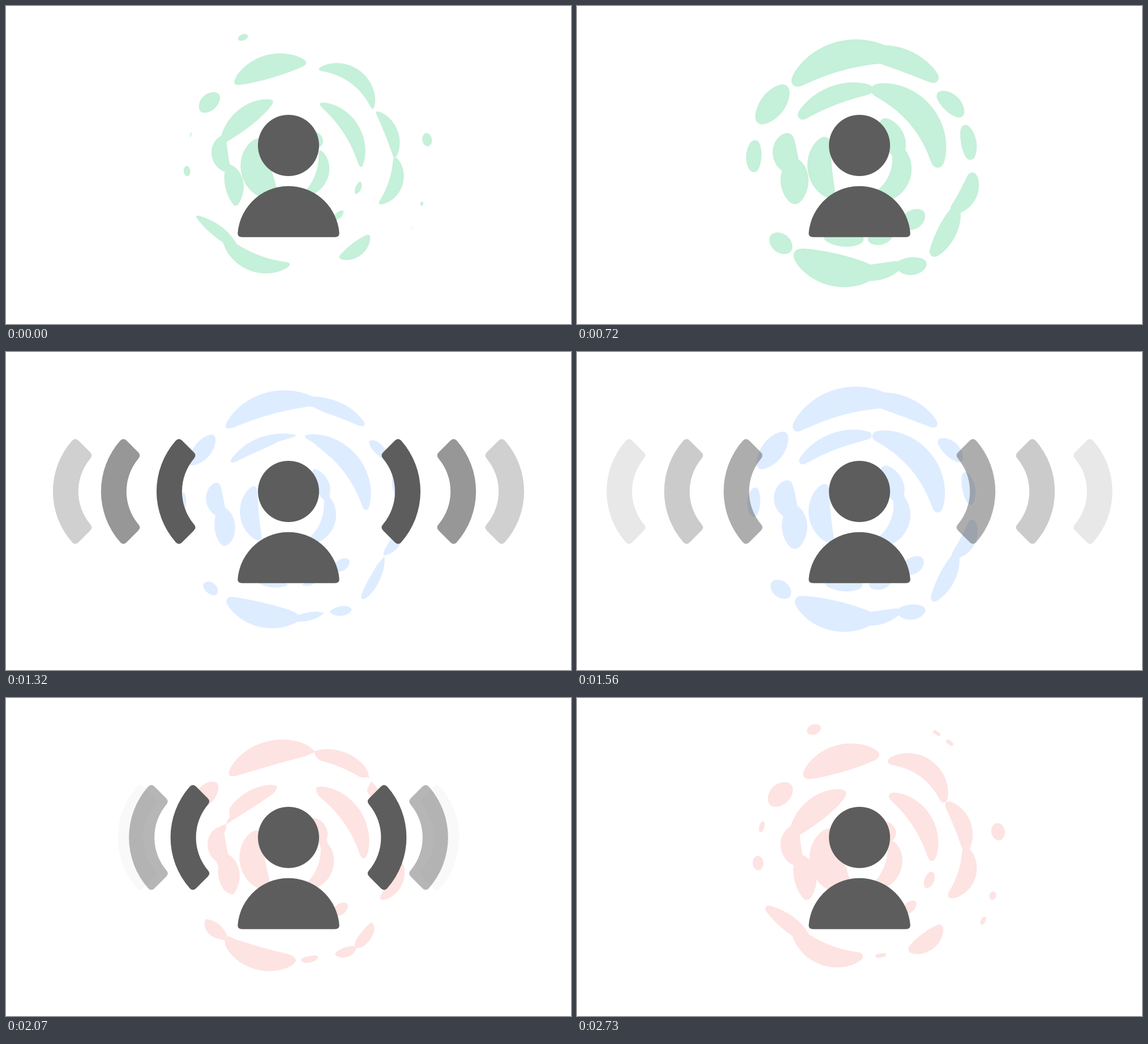
Recreate the animation shown at these times as an HTML page with a canvas. Size 998x561 px, loop 2.79 s.

```html
<!DOCTYPE html>
<html lang="en">
<head>
<meta charset="utf-8">
<title>Person with signal waves</title>
<style>
html, body { margin: 0; width: 100%; height: 100%; overflow: hidden; background: #fff; }
canvas { display: block; }
</style>
</head>
<body>
<canvas id="stage" width="998" height="561"></canvas>
<script>
const ctx = document.getElementById('stage').getContext('2d');
const CYCLE = 930, STEP = 30, LAST = 870;
const GREY = '#5d5d5d';
const TINTS = [[197, 240, 217], [222, 236, 255], [253, 227, 226]];
const RAD = Math.PI / 180;
const clamp = v => Math.max(0, Math.min(1, v));
const mix = (a, b, w) => a + (b - a) * w;

// Ripples are broken rings around one centre. Each pose is a clamped distance
// field, so the pieces merge and split when poses are mixed.
const X0 = 288, Y0 = 30, N = 480, REACH = 14;
const CX = 505 - X0, CY = 275 - Y0;
let field, scale;

function stamp(x, y, r) {
  const far = Math.max(r, 0) + REACH;
  const lo = v => Math.max(0, Math.floor(v - far));
  const hi = v => Math.min(N - 1, Math.ceil(v + far));
  for (let j = lo(y); j <= hi(y); j++) {
    for (let i = lo(x); i <= hi(x); i++) {
      const d = Math.min(REACH, r - Math.hypot(i + 0.5 - x, j + 0.5 - y));
      if (d > field[j * N + i]) field[j * N + i] = d;
    }
  }
}

// Tapered stroke between two angles; the radius passes through r0, r1, r2
function arc(from, to, w, r0, r1 = r0, r2 = r0) {
  const n = 4 + Math.ceil(Math.abs(to - from) * RAD * r1 / 2);
  for (let i = 0; i <= n; i++) {
    const u = i / n, a = mix(from, to, u) * RAD;
    const r = scale * (r0 * (1 - u) * (1 - 2 * u) + 4 * r1 * u * (1 - u) + r2 * u * (2 * u - 1));
    const taper = 0.2 + 0.8 * Math.abs(Math.sin(Math.PI * u)) ** 0.75;
    stamp(CX + r * Math.cos(a), CY + r * Math.sin(a), w * taper);
  }
}

const dot = (angle, r, w, half) => arc(angle - half, angle + half, w, r);

function pose(draw, size = 1) {
  field = new Float32Array(N * N).fill(-REACH);
  scale = size;
  draw();
  return field;
}

function calmRings() {
  // outer
  arc(235, 277, 21, 171, 173, 176);
  arc(287, 326, 14, 171, 187, 172);
  arc(330, 357, 12, 174, 183, 182);
  arc(358, 385, 13, 182, 187, 172);
  arc(63, 44, 13, 189, 192, 188);
  arc(132, 92, 16, 179, 190, 181);
  arc(150, 122, 11, 193, 179, 181);
  arc(210, 221.5, 15, 183, 180, 176);
  // middle
  arc(251, 196, 18, 112, 114, 128);
  arc(200, 172, 15, 128, 128, 112);
  arc(176, 143, 17, 112, 109, 124);
  arc(297, 363, 15, 114, 119, 122);
  dot(21.4, 126, 5.5, 5);
  dot(49, 125, 6, 5);
  // inner
  arc(212, 118, 27, 68, 65, 66);
  arc(340, 430, 12, 53, 58, 62);
  dot(316, 57, 13, 11);
  // droplets; the thinnest only show when thickened
  dot(248.5, 236, 6, 2);
  dot(175, 186, 6.5, 2.4);
  dot(350.7, 242, 9, 2.2);
  dot(17.8, 241, 3, 0.8);
  dot(301.4, 250, 0, 1);
  dot(308, 249, 0.5, 1);
  dot(195, 185, 1.5, 2);
  dot(29, 243, 1, 1);
  dot(80, 182, 0.5, 2);
}

function wideRings() {
  // outer
  arc(231, 285, 19, 184, 191, 193);
  arc(272, 310, 13, 192, 193, 194);
  arc(320, 333, 9, 181, 187, 191);
  dot(349.5, 190, 7, 7);
  arc(8, 27, 9, 195, 194, 183);
  arc(28, 51.5, 10, 185, 193, 203);
  arc(70, 60, 9, 195, 203, 208);
  arc(95, 72, 8, 195, 196, 193);
  arc(124, 86, 22, 199, 197, 195);
  arc(139, 131.5, 10, 206, 204, 203);
  dot(183, 193, 7, 6);
  arc(203, 222, 15, 195, 189, 189);
  // middle
  arc(218, 274, 10, 135, 128, 128);
  arc(281, 360, 18, 129, 131, 132);
  arc(197, 174, 15, 139, 138, 122);
  arc(178, 152, 18, 122, 125, 136);
  arc(55, 43, 10, 132, 135, 137);
  arc(115, 93, 9, 145, 138, 136);
  dot(77, 137, 6, 6);
  // inner
  arc(207, 138, 15, 76, 77, 80);
  arc(300, 345, 13, 78, 68, 64);
  arc(340, 425, 12, 64, 70, 67);
}

const calm = pose(calmRings);
const wide = pose(wideRings);
const shrunk = pose(wideRings, 0.96);
const middle = pose(calmRings, 1.04).map((d, i) => mix(d, shrunk[i], 0.5));

// time, pose, extra thickness
const KEYS = [
  [0, calm, -0.5], [30, calm, -0.5], [210, middle, 1.5], [450, wide, 0],
  [735, wide, 7], [780, calm, 10], [870, calm, 3]
];

const layer = document.createElement('canvas');
layer.width = layer.height = N;
const layerCtx = layer.getContext('2d');
const image = layerCtx.createImageData(N, N);
const mixed = new Float32Array(N * N);

function drawRipples(t, tint) {
  let k = 0;
  while (k < KEYS.length - 2 && t >= KEYS[k + 1][0]) k++;
  const [ta, a, growA] = KEYS[k], [tb, b, growB] = KEYS[k + 1];
  const w = clamp((t - ta) / (tb - ta)), grow = mix(growA, growB, w);
  for (let i = 0; i < mixed.length; i++) mixed[i] = mix(a[i], b[i], w) + grow;

  const px = image.data;
  for (let i = 0; i < mixed.length; i++) {
    const d = mixed[i];
    let cover = d > 0 ? 1 : 0;
    if (Math.abs(d) < 1 && i >= N && i < mixed.length - N) {
      const slope = Math.hypot(mixed[i + 1] - mixed[i - 1], mixed[i + N] - mixed[i - N]) / 2;
      cover = clamp(0.5 + d / Math.max(slope, 0.3));
    }
    px.set(tint, i * 4);
    px[i * 4 + 3] = cover * 255;
  }
  layerCtx.putImageData(image, 0, 0);
  ctx.drawImage(layer, X0, Y0);
}

// Ring segment open to the right, with rounded corners
function makeWave(R, r, c) {
  const p = new Path2D(), a = Math.PI * 0.75, b = Math.PI * 1.25;
  const at = (q, ang) => [q * Math.cos(ang), q * Math.sin(ang)];
  p.arc(0, 0, R, a + c / R, b - c / R);
  p.quadraticCurveTo(...at(R, b), ...at(R - c, b));
  p.lineTo(...at(r + c, b));
  p.quadraticCurveTo(...at(r, b), ...at(r, b - c / r));
  p.arc(0, 0, r, b - c / r, a + c / r, true);
  p.quadraticCurveTo(...at(r, a), ...at(r + c, a));
  p.lineTo(...at(R - c, a));
  p.quadraticCurveTo(...at(R, a), ...at(R, a + c / R));
  p.closePath();
  return p;
}
const wave = makeWave(135, 90, 8);

// cubic-bezier(.3, 0, 0, 1)
function ease(x) {
  let lo = 0, hi = 1;
  for (let i = 0; i < 24; i++) {
    const s = (lo + hi) / 2;
    if (0.9 * s * (1 - s) ** 2 + s ** 3 < x) lo = s; else hi = s;
  }
  return lo * lo * (3 - 2 * lo);
}

const WAVES = [
  { travel: 312, start: 60, length: 600, fade: 190, alpha: 0.285 },
  { travel: 210, start: 0, length: 630, fade: 90, alpha: 0.64 },
  { travel: 105, start: 0, length: 630, fade: 0, alpha: 1 }
];

function drawWaves(t) {
  const out = clamp((690 - t) / 120);
  ctx.fillStyle = GREY;
  for (const v of WAVES) {
    const alpha = v.alpha * clamp((t - v.fade) / 170) * out;
    if (!alpha) continue;
    const shift = v.travel * ease(clamp((t - v.start) / v.length));
    ctx.globalAlpha = alpha;
    for (const side of [1, -1]) {
      ctx.save();
      ctx.translate(499, 246);
      ctx.scale(side, 1);
      ctx.translate(-shift, 0);
      ctx.fill(wave);
      ctx.restore();
    }
  }
  ctx.globalAlpha = 1;
}

function drawPerson() {
  const floor = 407.7;
  ctx.fillStyle = GREY;
  ctx.beginPath();
  ctx.arc(499, 246, 54, 0, 2 * Math.PI);
  ctx.fill();
  ctx.beginPath();
  ctx.moveTo(417, floor);
  ctx.quadraticCurveTo(409, floor, 409.3, floor - 7.2);
  ctx.arc(499, floor, 90, Math.PI + 0.08, -0.08);
  ctx.quadraticCurveTo(589, floor, 581, floor);
  ctx.fill();
}

function draw(now) {
  const time = Math.floor(now / STEP) * STEP % (CYCLE * TINTS.length);
  const t = Math.min(time % CYCLE, LAST);
  ctx.fillStyle = '#fff';
  ctx.fillRect(0, 0, 998, 561);
  drawRipples(t, TINTS[Math.floor(time / CYCLE)]);
  drawWaves(t);
  drawPerson();
}

let begin;
function tick(now) {
  begin ??= now;
  draw(now - begin);
  requestAnimationFrame(tick);
}
draw(0);
requestAnimationFrame(tick);
</script>
</body>
</html>
```
